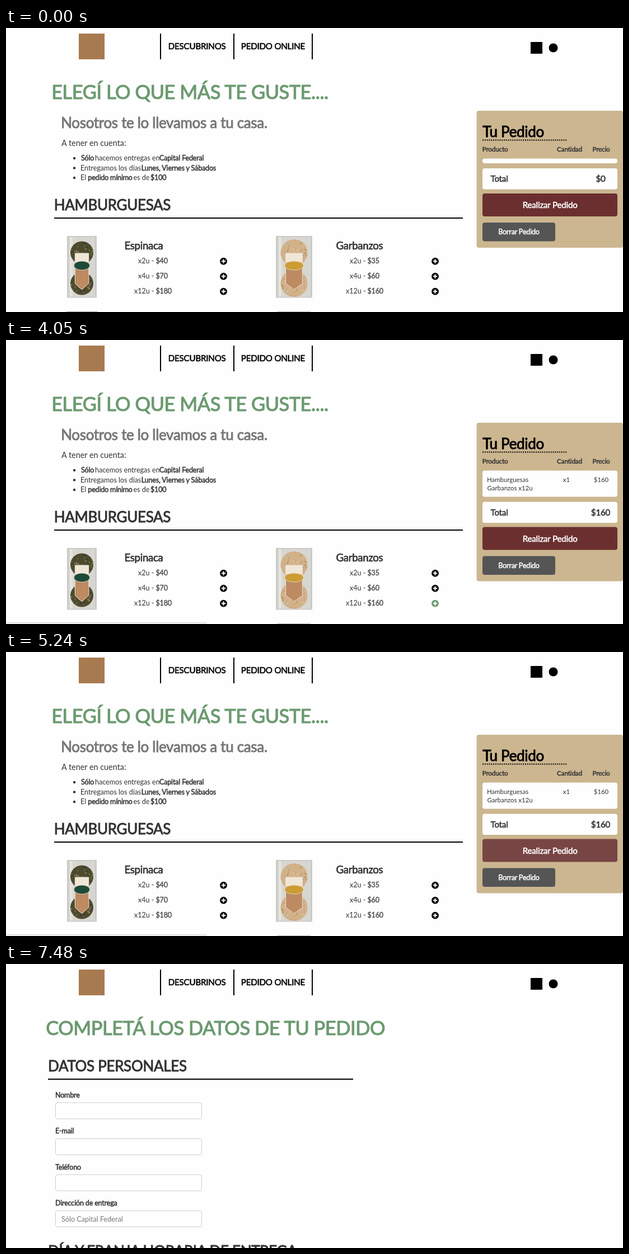
An HTML page that plays this animation: 1102x508 px, repeating every 8000 ms.

```html
<!DOCTYPE html>
<html lang="es">
<head>
<meta charset="utf-8">
<title>Pedido online</title>
<style>
  html, body { margin: 0; width: 100%; height: 100%; overflow: hidden; background: #fefefe; }
  svg { display: block; width: 100%; height: 100%; font-family: Lato, "Open Sans", sans-serif; }
  .bold { letter-spacing: -0.0125em; }
</style>
</head>
<body>
<svg id="stage" viewBox="0 0 1102 508"></svg>
<script>
const LOOP = 8000;
const SMALL = 11.4, BASE = 12.5, MEDIUM = 15.1, LARGE = 26, HUGE = 34.4;
const DARK = '#333', BLACK = '#000', GREEN = '#6b9a70', TAN = '#cbb690', WHITE = '#fefefe';

const stage = document.getElementById('stage');

function add(parent, tag, attrs, content) {
  const node = document.createElementNS('http://www.w3.org/2000/svg', tag);
  for (const key in attrs) node.setAttribute(key, attrs[key]);
  if (content !== undefined) node.textContent = content;
  parent.appendChild(node);
  return node;
}

const group = (parent, attrs = {}) => add(parent, 'g', attrs);

const rect = (parent, x, y, width, height, fill, rx = 0) =>
  add(parent, 'rect', { x, y, width, height, fill, rx });

const circle = (parent, cx, cy, r, fill) => add(parent, 'circle', { cx, cy, r, fill });

const text = (parent, x, y, size, content, fill = DARK, anchor = 'start') =>
  add(parent, 'text', { x, y, 'font-size': size, fill, 'text-anchor': anchor }, content);

// Synthetic bold: the regular face thickened by a size-dependent outline.
function bold(parent, x, y, size, content, fill = DARK, anchor = 'start') {
  const k = Math.min(1, Math.max(0, (size - 9) / 27));
  const node = text(parent, x, y, size, content, fill, anchor);
  node.setAttribute('class', 'bold');
  node.setAttribute('stroke', fill);
  node.setAttribute('stroke-width', size * (1 / 24 + k * (1 / 32 - 1 / 24)));
  return node;
}

function random(seed) {
  return () => (seed = (seed * 16807) % 2147483647) / 2147483647;
}

function drawHeader(root) {
  rect(root, 130, 10, 46, 46, '#a87a50');
  for (const x of [275, 406, 546]) rect(root, x, 10, 2, 46, BLACK);
  bold(root, 289.8, 38, MEDIUM, 'DESCUBRINOS', BLACK);
  bold(root, 419.8, 38, MEDIUM, 'PEDIDO ONLINE', BLACK);
  rect(root, 937, 25, 21, 21, BLACK);
  circle(root, 977.5, 35.5, 8, BLACK);
}

function drawPack(root, x, width, radius, food, speckles, oval, seed) {
  const cx = x + width / 2, rnd = random(seed);
  rect(root, x, 372, width, 110.5, '#c9cbc7');
  rect(root, x + 3, 374, width - 6, 107, '#d8d6d0');
  rect(root, x + 5, 374, 5, 106, '#e4e3df');
  for (const cy of [402, 457]) {
    circle(root, cx, cy, radius, food);
    for (let i = 0; i < 45; i++) {
      const angle = rnd() * 2 * Math.PI, d = Math.sqrt(rnd()) * (radius - 1.5);
      circle(root, cx + d * Math.cos(angle), cy + d * Math.sin(angle),
        0.6 + rnd(), speckles[i % speckles.length]);
    }
  }
  const half = width * 0.23;
  add(root, 'path', {
    d: `M${cx - half} 403h${2 * half}v54l${-half} 11l${-half} -11z`,
    fill: '#bd8a62', stroke: '#eee3d2', 'stroke-width': 1
  });
  rect(root, cx - half, 403, 2 * half, 16, '#efe6d6');
  add(root, 'ellipse', {
    cx, cy: 425, rx: half + 2, ry: 8, fill: oval, stroke: '#eee3d2', 'stroke-width': 0.8
  });
}

function drawPlus(root, x, y) {
  const icon = group(root, { fill: BLACK });
  add(icon, 'circle', { cx: x, cy: y, r: 6.4 });
  rect(icon, x - 3.7, y - 1, 7.4, 2, WHITE);
  rect(icon, x - 1, y - 3.7, 2, 7.4, WHITE);
  return icon;
}

function drawProduct(root, x, title, prices) {
  bold(root, x + 0.5, 395.5, 18.5, title);
  return ['x2u -', 'x4u -', 'x12u -'].map((amount, i) => {
    const y = 421 + 27 * i;
    text(root, x + (i < 2 ? 25 : 18), y, BASE, amount);
    bold(root, x + 56.5, y, BASE, '$' + prices[i], '#555');
    return drawPlus(root, x + 177.5, y - 3.8);
  });
}

function drawShop(root) {
  bold(root, 81.2, 126.5, HUGE, 'ELEGÍ LO QUE MÁS TE GUSTE....', GREEN);
  bold(root, 98.2, 178.5, LARGE, 'Nosotros te lo llevamos a tu casa.', '#777');
  text(root, 99, 211, 14.4, 'A tener en cuenta:');

  for (const y of [237, 254.5, 272]) circle(root, 122, y - 4, 2.2, DARK);
  bold(root, 134, 237, BASE, 'Sólo');
  text(root, 159, 237, BASE, 'hacemos entregas en');
  bold(root, 274, 237, BASE, 'Capital Federal');
  text(root, 133, 254.5, BASE, 'Entregamos los días');
  bold(root, 241.8, 254.5, BASE, 'Lunes, Viernes y Sábados');
  text(root, 133, 272, BASE, 'El');
  bold(root, 146.3, 272, BASE, 'pedido mínimo');
  text(root, 227.5, 272, BASE, 'es de');
  bold(root, 258, 272, BASE, '$100');

  bold(root, 85.8, 326, LARGE, 'HAMBURGUESAS');
  rect(root, 86, 339, 730, 2, BLACK);

  drawPack(root, 109, 53, 20.5, '#4b4a2f', ['#2c3222', '#6f6a43', '#98805a'], '#1f4a38', 11);
  drawPack(root, 482, 65, 24, '#d0b18a', ['#c49f74', '#dfc6a2', '#b98f63'], '#cc9c35', 29);
  rect(root, 108, 506.7, 56, 2, '#b9bab5');
  rect(root, 484, 506.7, 60, 2, '#c9cac7');

  drawProduct(root, 211, 'Espinaca', [40, 70, 180]);
  return drawProduct(root, 589, 'Garbanzos', [35, 60, 160])[2];
}

function drawOrder(root) {
  const panel = rect(root, 840.5, 148, 262, 245, TAN, 4);
  bold(root, 851.3, 195, LARGE, 'Tu Pedido', BLACK);
  add(root, 'path', {
    d: 'M851 200.5H1003', stroke: BLACK, 'stroke-width': 2, 'stroke-dasharray': '2 1.8'
  });
  bold(root, 850.7, 221, 11.7, 'Producto');
  bold(root, 1006.5, 221, 11.7, 'Cantidad', DARK, 'middle');
  bold(root, 1063, 221, 11.7, 'Precio', DARK, 'middle');

  const list = rect(root, 851, 233.5, 241, 8.5, WHITE, 4);
  const item = group(root);
  text(item, 859, 254, SMALL, 'Hamburguesas');
  text(item, 859.5, 268.7, SMALL, 'Garbanzos x12u');
  text(item, 1001, 254, SMALL, 'x1', DARK, 'middle');
  text(item, 1063, 254, SMALL, '$160', DARK, 'middle');

  const lower = group(root);
  rect(lower, 851, 251, 241, 37.5, WHITE, 4);
  bold(lower, 865.5, 275, MEDIUM, 'Total');
  const total = bold(lower, 1062, 275, MEDIUM, '$0', DARK, 'middle');
  const send = rect(lower, 851, 296, 241, 41, '#6b2f2f', 4);
  bold(lower, 971.7, 322, MEDIUM, 'Realizar Pedido', WHITE, 'middle');
  rect(lower, 851, 348, 130, 33.5, '#555', 4);
  bold(lower, 916, 369.3, BASE, 'Borrar Pedido', WHITE, 'middle');

  return { panel, list, item, lower, total, send };
}

function drawForm(root) {
  bold(root, 71.2, 126.5, HUGE, 'COMPLETÁ LOS DATOS DE TU PEDIDO', GREEN);
  bold(root, 75, 191.5, LARGE, 'DATOS PERSONALES');
  rect(root, 75, 205, 545, 2, BLACK);
  ['Nombre', 'E-mail', 'Teléfono', 'Dirección de entrega'].forEach((label, i) => {
    const y = 239 + 64.4 * i;
    bold(root, 88, y, BASE, label);
    const box = rect(root, 88.5, y + 9, 261, 29, '#fff', 3.5);
    box.setAttribute('stroke', '#ccc');
  });
  text(root, 99, 461, 12.6, 'Sólo Capital Federal', '#777');
  bold(root, 75, 523, LARGE, 'DÍA Y FRANJA HORARIA DE ENTREGA');
}

rect(stage, 0, 0, 1102, 508, WHITE);
drawHeader(stage);
const shop = group(stage);
const plus = drawShop(shop);
const order = drawOrder(shop);
const form = group(stage);
drawForm(form);
const status = add(stage, 'path', {
  d: 'M-2 505.5H355q2.5 0 2.5 2.5v4H-2z', fill: '#f2f2f2', stroke: '#d6d6d6'
});

const show = (node, on) => node.setAttribute('display', on ? 'inline' : 'none');
const within = (t, from, to) => t >= from && t < to;

function render(t) {
  const onForm = t >= 6730, filled = t >= 4050;
  const grow = filled ? 38.5 : 0;
  show(shop, !onForm);
  show(form, onForm);
  show(status, within(t, 1650, 7480));
  status.setAttribute('opacity', t >= 7330 ? 0.5 : 1);
  plus.setAttribute('fill', within(t, 1500, 4650) ? GREEN : BLACK);

  show(order.item, filled);
  order.panel.setAttribute('height', 245 + grow);
  order.list.setAttribute('height', 8.5 + grow);
  order.lower.setAttribute('transform', `translate(0 ${grow})`);
  order.total.textContent = filled ? '$160' : '$0';
  order.send.setAttribute('fill', t < 4790 ? '#6b2f2f' : t < 5240 ? '#713a39' : '#774543');
}

function frame() {
  render(performance.now() % LOOP);
  requestAnimationFrame(frame);
}
frame();
</script>
</body>
</html>
```
